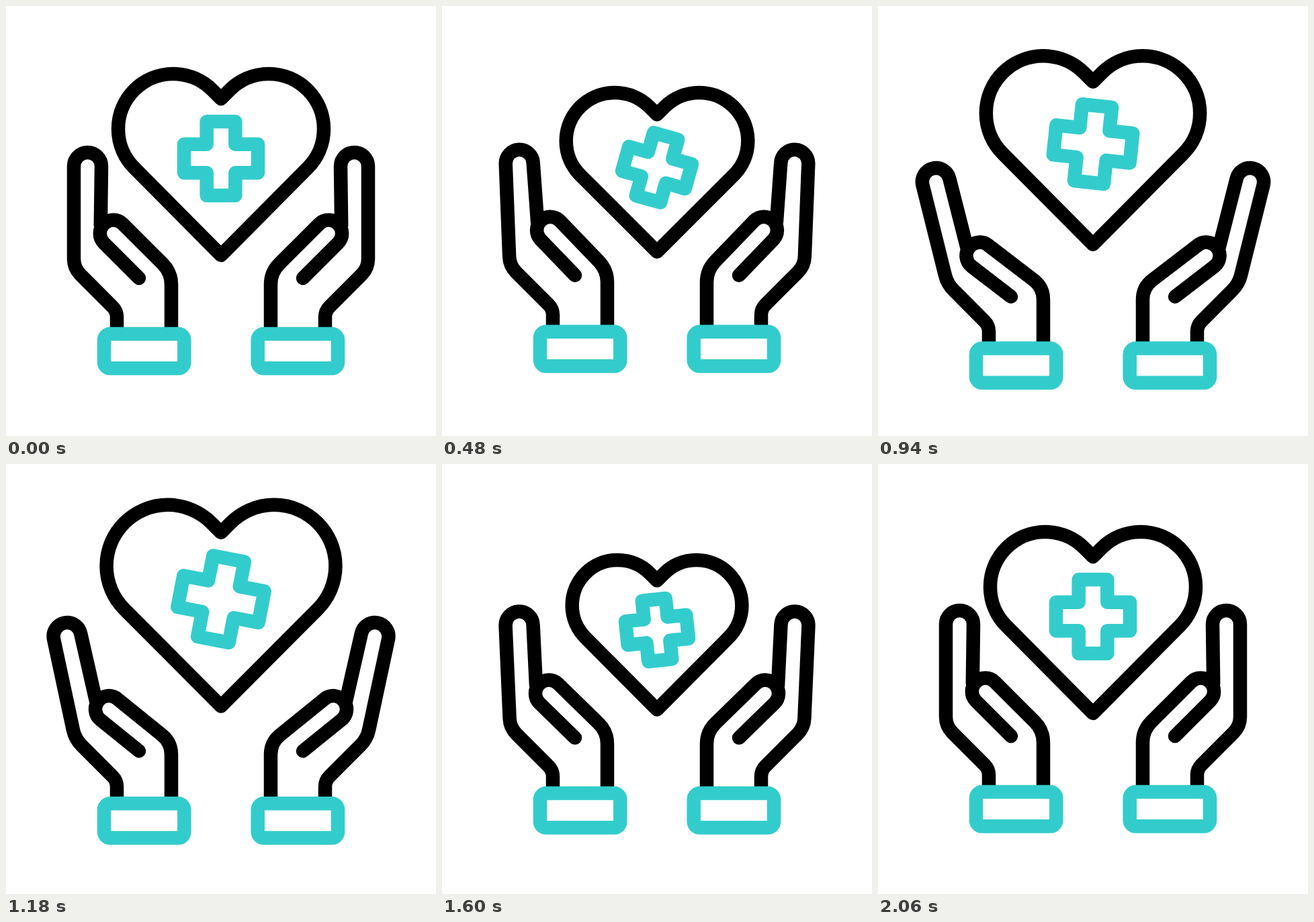
Animation, 640 px wide and 640 px high, one loop 2320 ms. Source, as an HTML page:

```html
<!DOCTYPE html>
<html>
<head>
<meta charset="utf-8">
<style>
html, body { margin: 0; height: 100%; overflow: hidden; background: #fff; }
svg { display: block; width: 100%; height: 100%; }
path, rect { fill: none; stroke: #000; stroke-width: 20.5; stroke-linejoin: round; stroke-linecap: round; vector-effect: non-scaling-stroke; }
.teal { stroke: #33cccc; }
</style>
</head>
<body>
<svg viewBox="0 0 640 640">
  <defs>
    <g id="hand">
      <path id="fingers"/>
      <rect id="cuff" class="teal" x="146" width="119.3" height="51.3" rx="9"/>
    </g>
  </defs>
  <use href="#hand"/>
  <use href="#hand" transform="translate(640) scale(-1 1)"/>
  <path id="heart" d="M0 144L-129 14A82 82 0 0 1-13-102L0-89L13-102A82 82 0 0 1 129 14Z"/>
  <path id="cross" class="teal" d="M-21.3-55H21.3V-21.3H55V21.3H21.3V55H-21.3V21.3H-55V-21.3H-21.3Z"/>
</svg>
<script>
const LOOP = 2320;
const RAD = Math.PI / 180;
const $ = id => document.getElementById(id);

// Key poses: time, hand drop, finger lean, heart height, heart size, cross turn
const poses = [
  [200, 0, 0, 227, 1, 0],
  [320, -17, 5, 246, .933, -3.5],
  [640, 13, -10, 229.5, .873, 40],
  [940, 21.5, -14, 205.5, 1.04, 96],
  [1280, 12, -9.5, 204, 1.13, 100],
  [1360, -7, 0, 225, 1.088, 98],
  [1600, 2, -2.5, 247, .826, 84],
  [1830, 3, -2.5, 219, 1.05, 93],
  [2060, 0, 0, 227, 1, 90]
];

// Smooth curve through the key poses, at rest at both ends.
function poseAt(time) {
  const last = poses.length - 1;
  const t = Math.min(Math.max(time, poses[0][0]), poses[last][0] - 1e-6);
  const i = poses.findIndex(p => p[0] > t) - 1;
  const a = poses[i], b = poses[i + 1];
  const d = b[0] - a[0], u = (t - a[0]) / d, r = 1 - u;
  const slope = (k, c) => k === 0 || k === last ? 0
    : (poses[k + 1][c] - poses[k - 1][c]) / (poses[k + 1][0] - poses[k - 1][0]);
  return a.map((v, c) => v * r * r * (1 + 2 * u) + b[c] * u * u * (3 - 2 * u)
    + d * u * r * (slope(i, c) * r - slope(i + 1, c) * u));
}

const step = ([x, y], deg, dist) => [x + dist * Math.cos(deg * RAD), y + dist * Math.sin(deg * RAD)];
const toward = (a, b, dist) => step(a, Math.atan2(b[1] - a[1], b[0] - a[0]) / RAD, dist);
const bend = (from, corner, to, size) => `L${toward(corner, from, size)}Q${corner} ${toward(corner, to, size)}`;
const halfTurn = to => `A1 1 0 0 1 ${to}`;

function handPath(drop, lean) {
  const wrist = [165, 485 + drop], heel = [165, 454 + drop];
  const knuckle = [101 + .1 * drop, 390 + 1.1 * drop];
  const tipLeft = step(knuckle, lean - 90, 151.5), tipRight = step(tipLeft, lean, 41);

  const tilt = 45 - .35 * drop;
  const crease = [198, 405 + 1.28 * drop];
  const low = step(crease, tilt + 180, 74), high = step(low, tilt - 90, 40);
  const joint = [(low[0] + high[0]) / 2 - 19, (low[1] + high[1]) / 2 - 12];
  const palm = [246, high[1] + (246 - high[0]) * Math.tan(tilt * RAD)];
  const inner = [246, 485 + drop];

  return `M${wrist}${bend(wrist, heel, knuckle, 9)}${bend(heel, knuckle, tipLeft, 13.7)}`
    + `L${tipLeft}${halfTurn(tipRight)}L${joint}`
    + `M${crease}L${low}${halfTurn(high)}${bend(high, palm, inner, 18)}L${inner}`;
}

function draw(time) {
  const [, drop, lean, y, size, turn] = poseAt(time);
  // The heart flattens while the cross is between upright positions.
  const flat = Math.sin(2 * turn * RAD) ** 2;
  $('fingers').setAttribute('d', handPath(drop, lean));
  $('cuff').setAttribute('y', 488 + drop);
  $('heart').setAttribute('transform', `translate(320 ${y - 4 * flat}) scale(${size} ${size * (1 - .03 * flat)})`);
  $('cross').setAttribute('transform', `translate(320 ${y}) rotate(${turn}) scale(${size})`);
}

const start = performance.now();
function tick() {
  draw((performance.now() - start) % LOOP);
  requestAnimationFrame(tick);
}
tick();
</script>
</body>
</html>
```
